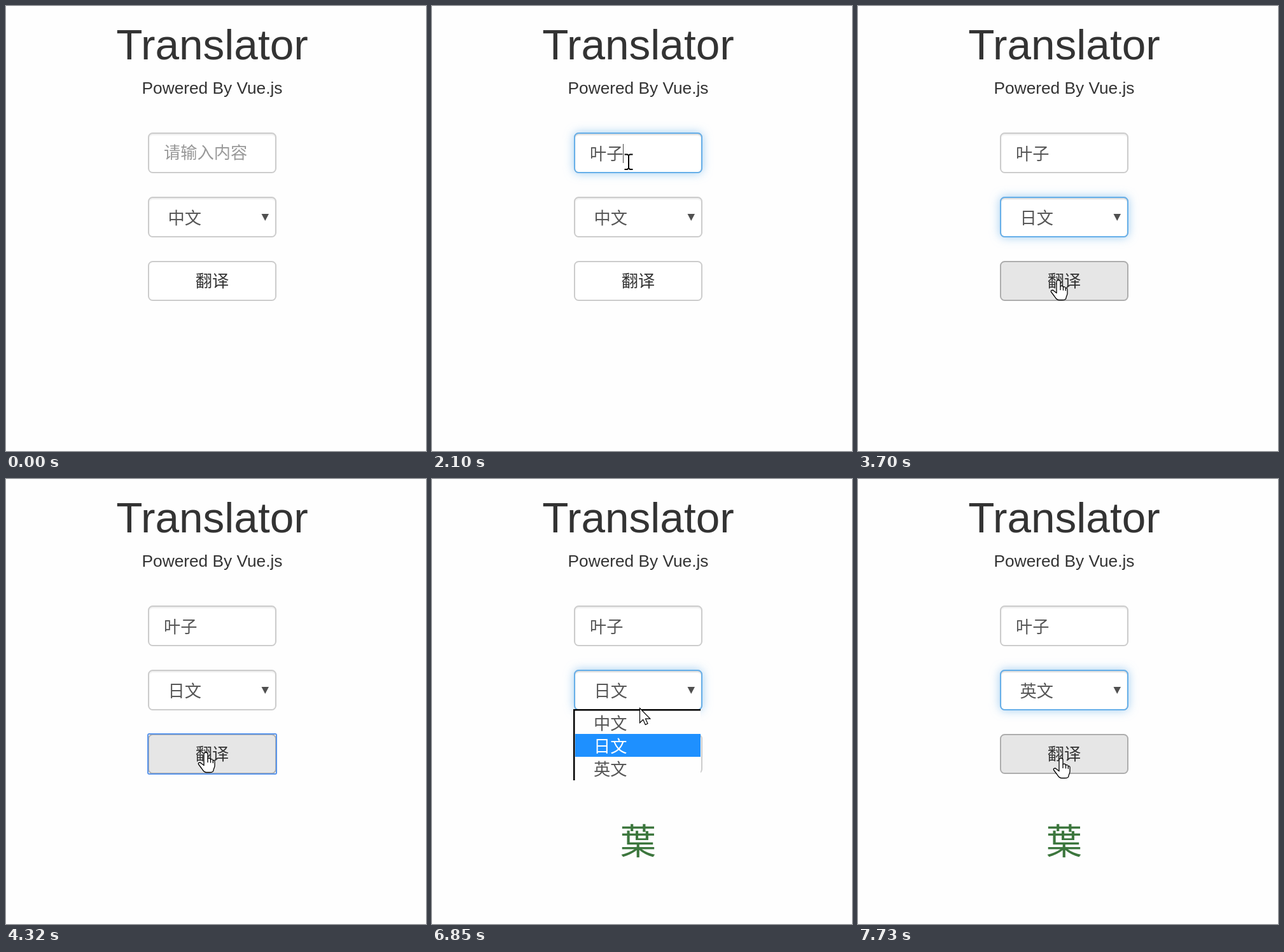
Write an HTML page that moves like this. It is 660 px wide and 700 px high and loops after 8000 ms.

```html
<!DOCTYPE html>
<html lang="zh-CN">
<head>
<meta charset="utf-8">
<title>Translator</title>
<style>
  html, body { margin: 0; width: 100%; height: 100%; overflow: hidden; background: #fefefe; }
  .box, .ring, .outline { position: absolute; box-sizing: border-box; }
  .box { left: 223px; width: 202px; height: 64px; border: 2px solid #ccc; border-radius: 7.5px; background: #fff; }
  .field { box-shadow: inset 0 2px 2px rgba(0, 0, 0, .075); }
  .ring {
    inset: -2px; border: 2px solid #66afe9; border-radius: 7.5px; opacity: 0;
    box-shadow: inset 0 2px 2px rgba(0, 0, 0, .075), 0 0 15px rgba(102, 175, 233, .6);
  }
  #input { top: 199px; }
  #select { top: 300px; }
  #button { top: 401px; height: 63px; }
  .outline { left: 222px; top: 400px; width: 204px; height: 65px; border: 2px solid #5b95ea; border-radius: 3px; }
  svg { position: absolute; left: 0; top: 0; }
  text { font: 26.25px "Noto Sans CJK SC", "Noto Sans CJK", sans-serif; fill: #555; }
  .latin { font-family: "Liberation Sans", Arial, sans-serif; fill: #333; text-anchor: middle; }
  #title { font-size: 67.5px; }
  #result { font: 56.25px "Noto Sans CJK JP", "Noto Sans CJK", sans-serif; fill: #3c763d; text-anchor: middle; }
</style>
</head>
<body>
<div class="box field" id="input"><div class="ring"></div></div>
<div class="box field" id="select"><div class="ring"></div></div>
<div class="box" id="button"></div>
<div class="outline" id="outline"></div>

<svg width="660" height="700" viewBox="0 0 660 700">
  <text class="latin" id="title" x="324" y="84">Translator</text>
  <text class="latin" x="324" y="138">Powered By Vue.js</text>
  <text id="value" x="248"></text>
  <rect id="caret" y="217" width="1" height="30" fill="#444"/>
  <text id="choice" x="254.5" y="343"></text>
  <path d="M401.5 327h11.5l-5.75 11z" fill="#505050"/>
  <text x="297.7" y="442" style="fill:#333">翻译</text>
  <text id="result" x="324" y="590.4">葉</text>

  <g id="menu">
    <rect x="222" y="362" width="200" height="112"/>
    <rect x="224.5" y="364.5" width="197.5" height="109.5" fill="#fefefe"/>
    <rect id="mark" x="225" width="197" height="36" fill="#1e90ff"/>
    <text class="item" x="254" y="394">中文</text>
    <text class="item" x="254" y="430">日文</text>
    <text class="item" x="254" y="466">英文</text>
  </g>

  <g id="cursor">
    <path id="arrow" d="M.5 .5V23.5L5.7 18.6 9.3 26.4 13 24.8 9.5 17.2H16.8z" fill="#fff" stroke="#000" stroke-width="1.2"/>
    <path id="beam" d="M-6.5-11.5h4.5L0-10 2-11.5h4.5M0-10V10M-6.5 12h4.5L0 10 2 12h4.5" fill="none" stroke="#000" stroke-width="2"/>
    <g id="hand" fill="#fff" stroke="#000" stroke-width="1.3" stroke-linejoin="round">
      <path d="M-3 3C-3-1 3-1 3 3V10C4 8.5 7.5 9 7.5 11.5 8.5 10 11 10.5 11.3 13 12.5 12 14 12.5 14 15V21C14 24 12 26 12 28 12 30 10 31.5 6 31.5H1C-3 31.5-4 29-6 26L-11.3 19C-13 16.5-9.5 15-7.5 17L-3 20.5z"/>
      <path d="M3 10v6M7.5 11.5v5M11.3 13v4" fill="none"/>
    </g>
  </g>
</svg>

<script>
  const LOOP = 8000;
  const $ = id => document.getElementById(id);
  const items = [...document.querySelectorAll('.item')];
  const rings = { input: $('input').firstChild, select: $('select').firstChild };
  const langs = ['中文', '日文', '英文'];

  const ease = {
    in: p => p * p,
    out: p => 1 - (1 - p) ** 2,
    both: p => p * p * (3 - 2 * p),
    line: p => p
  };

  // Pointer moves: start, end, target x, target y, easing
  const start = [508, 690];
  const moves = [
    [30, 530, 315, 259.5, 'out'],
    [660, 730, 314.5, 232.5, 'both'],
    [1140, 1450, 312, 241, 'both'],
    [1780, 1890, 310, 243.5, 'both'],
    [2080, 2100, 309, 245, 'line'],
    [2100, 2470, 317, 330, 'both'],
    [2780, 3170, 306, 414, 'both'],
    [3420, 3680, 314.5, 431, 'both'],
    [4319, 4320, 314, 430, 'line'],
    [6240, 6480, 322, 325, 'both'],
    [6690, 6850, 326, 359, 'in'],
    [6850, 7210, 300, 457, 'out'],
    [7560, 7730, 319, 439, 'both']
  ];

  const within = (t, a, b) => t >= a && t < b;
  const ramp = (t, a, d) => Math.min(1, Math.max(0, (t - a) / d));
  const show = (id, on) => $(id).style.display = on ? '' : 'none';

  function pointer(t) {
    let [x, y] = start;
    for (const [a, b, tx, ty, kind] of moves) {
      if (t < a) break;
      const p = ease[kind](ramp(t, a, b - a));
      x += (tx - x) * p;
      y += (ty - y) * p;
    }
    return [x, y];
  }

  function draw(t) {
    const [x, y] = pointer(t);
    const open = within(t, 2640, 3340) || within(t, 6660, 7400);
    const chosen = t < 3340 ? 0 : t < 7400 ? 1 : 2;
    const over = (top, bottom) => !open && x >= 223 && x < 425 && y >= top && y < bottom;
    const hover = t >= 30 && over(401, 464);
    const focused = within(t, 3720, 6660);
    const pressed = within(t, 3720, 3850);
    const typed = t >= 1780;

    rings.input.style.opacity = ramp(t, 890, 80) - ramp(t, 2610, 50);
    rings.select.style.opacity = ramp(t, 2610, 50) - ramp(t, 3710, 120) + ramp(t, 6650, 120);

    const btn = $('button').style;
    btn.background = pressed ? '#d4d4d4' : hover || focused ? '#e6e6e6' : '#fff';
    btn.borderColor = pressed ? '#8c8c8c' : hover ? '#adadad' : focused ? '#8c8c8c' : '#ccc';
    show('outline', focused);

    const value = $('value');
    value.textContent = typed ? '叶子' : '请输入内容';
    value.setAttribute('y', typed ? 241.6 : 240);
    value.style.fill = typed ? '#555' : '#999';
    $('caret').setAttribute('x', typed ? 300 : 248);
    show('caret', within(t, 900, 1450) || within(t, 1780, 2420));

    $('choice').textContent = langs[chosen];
    show('result', t >= 5950);

    show('menu', open);
    const row = Math.floor((y - 365) / 36);
    const lit = row >= 0 && row < 3 ? row : chosen;
    $('mark').setAttribute('y', 365 + lit * 36);
    items.forEach((el, i) => el.style.fill = i === lit ? '#fff' : '#555');

    const beam = over(199, 263);
    show('cursor', t >= 30);
    show('beam', beam);
    show('hand', hover);
    show('arrow', !beam && !hover);
    $('cursor').setAttribute('transform', `translate(${Math.round(x)} ${Math.round(y)})`);
  }

  const begin = performance.now();
  function tick() {
    draw((performance.now() - begin) % LOOP);
    requestAnimationFrame(tick);
  }
  tick();
</script>
</body>
</html>
```
